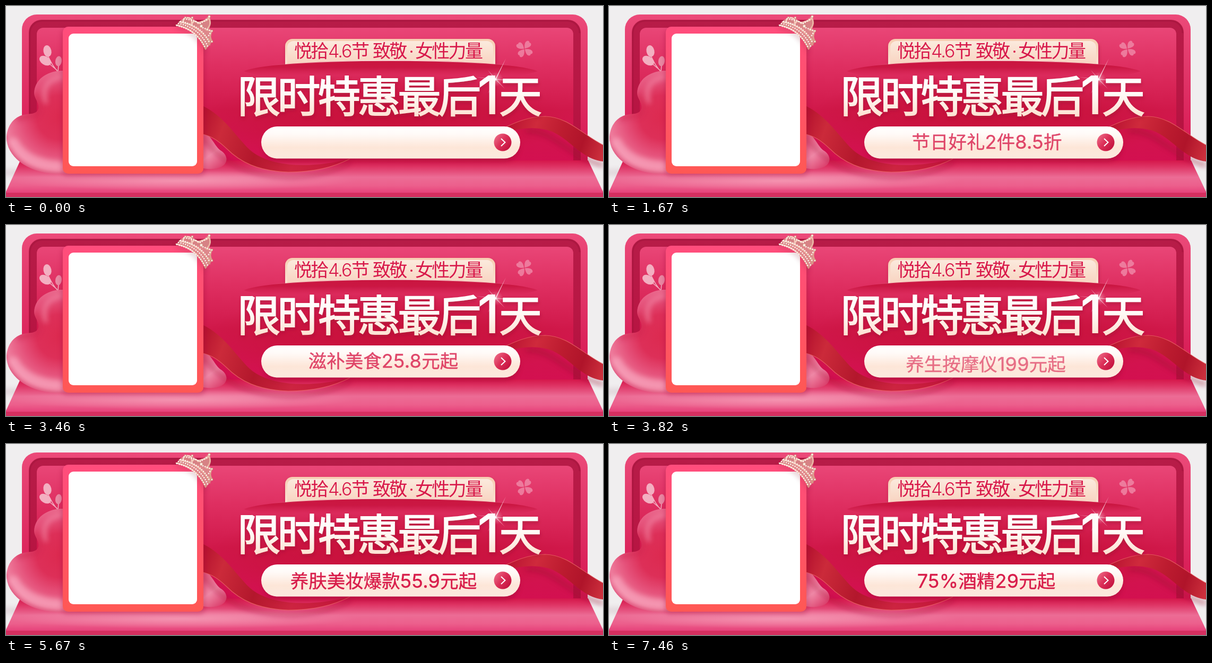
An HTML page for the animation above (8 s loop, 1125 by 360 pixels).

```html
<!DOCTYPE html>
<html lang="zh-CN">
<head>
<meta charset="utf-8">
<title>限时特惠</title>
<style>
html, body { margin: 0; width: 100%; height: 100%; overflow: hidden; background: #f0eeef; }
svg { display: block; width: 1125px; height: 360px; }
text { font-family: "Noto Sans CJK SC", "Noto Sans CJK", sans-serif; }
.num { font-family: Inter, "Liberation Sans", sans-serif; }
.tag { font-size: 34px; font-weight: 300; letter-spacing: -2.7px; fill: #d8184a; }
.title { font-size: 81px; letter-spacing: -5.4px; fill: url(#cream); stroke: url(#cream); stroke-width: 2px; }
.title .num { font-size: 101px; font-weight: 500; stroke: none; }
.offer { font-size: 34.5px; fill: #d81c4a; stroke: #d81c4a; stroke-width: .4px; text-anchor: middle;
  opacity: 0; animation: pass 8s infinite; animation-delay: calc(180ms + var(--i) * 1790ms); }
.offer .num { font-size: 36px; letter-spacing: .3px; }
.offer.last { animation-name: stay; }

/* five 30 ms steps in, hold, five steps out */
@keyframes pass {
  0% { opacity: .2; transform: translateY(8px); animation-timing-function: steps(5, jump-none); }
  1.875% { opacity: 1; transform: translateY(0); animation-timing-function: step-end; }
  18.625% { opacity: .8; transform: translateY(-2px); animation-timing-function: steps(5, jump-none); }
  20.5%, 100% { opacity: 0; transform: translateY(-10px); }
}
@keyframes stay {
  0% { opacity: .2; transform: translateY(8px); animation-timing-function: steps(5, jump-none); }
  1.875% { opacity: 1; transform: translateY(0); animation-timing-function: step-end; }
  8.25%, 100% { opacity: 0; transform: translateY(0); }
}
</style>
</head>
<body>
<svg viewBox="0 0 1125 360">
<defs>
  <linearGradient id="rim" x2="0" y2="1">
    <stop stop-color="#ec4a79"/><stop offset=".3" stop-color="#e33a6c"/><stop offset="1" stop-color="#d6134f"/>
  </linearGradient>
  <linearGradient id="groove" x2="0" y2="1">
    <stop stop-color="#b71c48"/><stop offset=".5" stop-color="#b81744"/><stop offset="1" stop-color="#b50f3e"/>
  </linearGradient>
  <linearGradient id="wall" x2="0" y2="1">
    <stop stop-color="#e94677"/><stop offset=".3" stop-color="#de2e60"/>
    <stop offset=".62" stop-color="#d0184a"/><stop offset="1" stop-color="#d31050"/>
  </linearGradient>
  <radialGradient id="deep">
    <stop stop-color="#c61038" stop-opacity=".85"/><stop offset=".6" stop-color="#c61038" stop-opacity=".5"/>
    <stop offset="1" stop-color="#c61038" stop-opacity="0"/>
  </radialGradient>
  <linearGradient id="floor" x2="0" y2="1">
    <stop stop-color="#d5174b"/><stop offset=".2" stop-color="#de3464"/><stop offset=".52" stop-color="#ec6c95"/>
    <stop offset=".78" stop-color="#ec5f8c"/><stop offset="1" stop-color="#e6427a"/>
  </linearGradient>
  <radialGradient id="sheen">
    <stop stop-color="#f7a3bb" stop-opacity=".75"/><stop offset="1" stop-color="#f7a3bb" stop-opacity="0"/>
  </radialGradient>
  <linearGradient id="slot" x2="0" y2="1">
    <stop stop-color="#c9153f"/><stop offset=".35" stop-color="#cb1743"/><stop offset=".8" stop-color="#cd1b49" stop-opacity="0"/>
  </linearGradient>
  <linearGradient id="arc"><stop stop-color="#ffd8d8" stop-opacity="0"/>
    <stop offset=".5" stop-color="#fff0ec"/><stop offset="1" stop-color="#ffd8d8" stop-opacity="0"/>
  </linearGradient>
  <linearGradient id="label" x2="0" y2="1"><stop stop-color="#fbeadd"/><stop offset="1" stop-color="#f8d2bf"/></linearGradient>
  <linearGradient id="labelRim" x2="0" y2="1"><stop stop-color="#f7cdb2"/><stop offset="1" stop-color="#fae3d4"/></linearGradient>
  <linearGradient id="cream" gradientUnits="userSpaceOnUse" x1="0" y1="130" x2="0" y2="210">
    <stop stop-color="#fff"/><stop offset=".45" stop-color="#fffaf6"/><stop offset="1" stop-color="#fde0d0"/>
  </linearGradient>
  <linearGradient id="pill" x2="0" y2="1">
    <stop stop-color="#fff"/><stop offset=".25" stop-color="#fffaf7"/><stop offset=".65" stop-color="#fde6d8"/><stop offset="1" stop-color="#fbe9de"/>
  </linearGradient>
  <linearGradient id="knob" x2="1" y2=".8">
    <stop stop-color="#ef7790"/><stop offset=".5" stop-color="#dc3159"/><stop offset="1" stop-color="#c20f3c"/>
  </linearGradient>
  <linearGradient id="card" x2="0" y2="1"><stop stop-color="#ff4d7d"/><stop offset="1" stop-color="#ff5854"/></linearGradient>
  <radialGradient id="heart" gradientUnits="userSpaceOnUse" cx="100" cy="210" r="118">
    <stop stop-color="#dc2a50"/><stop offset=".35" stop-color="#dd2f58"/><stop offset=".6" stop-color="#e5517a"/>
    <stop offset=".85" stop-color="#ee7a9b"/><stop offset="1" stop-color="#e0527c"/>
  </radialGradient>
  <linearGradient id="bud" x1=".2" x2=".7" y2="1"><stop stop-color="#dd4d72"/><stop offset=".6" stop-color="#f08aa8"/><stop offset="1" stop-color="#dc426e"/></linearGradient>
  <linearGradient id="ribL" gradientUnits="userSpaceOnUse" x1="372" y1="200" x2="650" y2="300">
    <stop stop-color="#b5122f"/><stop offset=".15" stop-color="#cb2a3a"/><stop offset=".4" stop-color="#b3172c"/>
    <stop offset=".65" stop-color="#cc2440"/><stop offset="1" stop-color="#c3153a"/>
  </linearGradient>
  <linearGradient id="ribR" gradientUnits="userSpaceOnUse" x1="940" y1="215" x2="1125" y2="280">
    <stop stop-color="#b50f30"/><stop offset=".3" stop-color="#cf2a3c"/><stop offset=".55" stop-color="#bd1c30"/>
    <stop offset=".78" stop-color="#b0142a"/><stop offset="1" stop-color="#cc303d"/>
  </linearGradient>
  <linearGradient id="gold" x2="1" y2="1"><stop stop-color="#fae0d2"/><stop offset=".5" stop-color="#f0bfae"/><stop offset="1" stop-color="#d08d78"/></linearGradient>
  <radialGradient id="glow"><stop stop-color="#fff"/><stop offset=".25" stop-color="#fff" stop-opacity=".5"/><stop offset="1" stop-color="#ffd0d8" stop-opacity="0"/></radialGradient>
  <filter id="soft" x="-50%" y="-50%" width="200%" height="200%"><feGaussianBlur stdDeviation="5"/></filter>
  <filter id="drop" x="-5%" y="-20%" width="110%" height="150%">
    <feDropShadow dx="1" dy="4" stdDeviation="3" flood-color="#9c0a30" flood-opacity=".5"/>
  </filter>
  <path id="petal" d="M0-1C-4-5-8-12-4-16Q-1-18 1-15Q4-17 6-13C7-9 3-4 0-1Z"/>
  <clipPath id="heartEdge"><use href="#heartShape"/></clipPath>
  <path id="heartShape" d="M140 122H104C76 123 54 139 53 164C53 174 63 182 61 193C58 206 42 202 30 206C13 211 1 228 1 250C3 286 44 318 108 317H140Z"/>
</defs>

<rect width="1125" height="360" fill="#f0eeef"/>
<ellipse cx="30" cy="314" rx="60" ry="7" fill="#d9c8cf" opacity=".6" filter="url(#soft)"/>

<!-- stage wall -->
<path d="M30 300V44a28 28 0 0 1 28-28H1068a28 28 0 0 1 28 28V300Z" fill="url(#rim)"/>
<path d="M43 291V50a24 24 0 0 1 24-24H1059a24 24 0 0 1 24 24V291Z" fill="url(#groove)"/>
<path d="M45 291V51a23 23 0 0 1 23-23H1058a23 23 0 0 1 23 23" fill="none" stroke="#9b1239" stroke-width="3" opacity=".4"/>
<path d="M58 291V53a12 12 0 0 1 12-12H1057a12 12 0 0 1 12 12V291Z" fill="url(#wall)"/>
<ellipse cx="715" cy="212" rx="345" ry="84" fill="url(#deep)"/>

<!-- floor -->
<path d="M27 291H1097L1125 350V352H0V350Z" fill="url(#floor)"/>
<ellipse cx="330" cy="329" rx="330" ry="19" fill="url(#sheen)"/>
<rect y="352" width="1125" height="8" fill="#d52f60"/>

<!-- sprig -->
<g fill="#f3afc1" stroke="#f3afc1" stroke-width="1.6">
  <path d="M79 94Q87 112 97 123M83 110Q90 116 96 121M99 112L98 123" fill="none"/>
  <ellipse cx="78" cy="85" rx="7.5" ry="11" transform="rotate(-12 78 85)" stroke="none"/>
  <ellipse cx="74" cy="103" rx="8" ry="12" transform="rotate(-58 74 103)" stroke="none"/>
  <ellipse cx="99" cy="104" rx="6" ry="9.5" transform="rotate(8 99 104)" stroke="none" fill="#e98aa4"/>
</g>

<!-- balloon hearts -->
<use href="#heartShape" fill="url(#heart)"/>
<g clip-path="url(#heartEdge)" fill="none" stroke-linecap="round">
  <path d="M104 134C78 138 68 154 74 180" stroke="#f493ad" stroke-width="10" opacity=".5" filter="url(#soft)"/>
  <path d="M14 258C28 286 60 300 104 303" stroke="#f8a5bd" stroke-width="20" opacity=".7" filter="url(#soft)"/>
  <path d="M54 168Q68 190 56 206Q40 208 24 212" stroke="#cf2850" stroke-width="9" opacity=".55" filter="url(#soft)"/>
  <path d="M3 270C20 306 60 318 108 318" stroke="#d23764" stroke-width="6" opacity=".6" filter="url(#soft)"/>
</g>
<path d="M365 232C389 244 391 262 404 272C419 281 419 296 406 303C394 309 376 308 365 304Z" fill="url(#bud)"/>

<!-- ribbon -->
<path d="M372 250C415 305 470 322 540 322C590 320 620 310 650 294" fill="none" stroke="#a50d37" stroke-width="8" opacity=".35" filter="url(#soft)"/>
<path d="M368 187C406 204 428 238 454 266C490 304 570 308 648 288C614 306 572 313 532 313C474 311 441 294 416 269C399 253 387 245 368 241Z" fill="url(#ribL)"/>
<path d="M368 241C387 245 399 253 416 269C441 294 474 311 532 313C572 313 614 306 648 288" fill="none" stroke="#ee6a69" stroke-width="1.2" opacity=".75"/>
<path d="M980 236C1030 232 1060 285 1125 300" fill="none" stroke="#9a0b31" stroke-width="9" opacity=".4" filter="url(#soft)"/>
<path d="M925 236C958 220 984 208 1016 208C1058 209 1084 240 1125 262V293C1084 288 1066 254 1030 237C1003 226 966 229 925 242Z" fill="url(#ribR)"/>
<path d="M925 236C958 220 984 208 1016 208C1058 209 1084 240 1125 262" fill="none" stroke="#ea6464" stroke-width="1.2" opacity=".75"/>

<!-- picture card -->
<rect x="105" y="44" width="270" height="276" rx="10" fill="#a50b38" opacity=".35" filter="url(#soft)"/>
<rect x="107" y="39" width="265" height="277" rx="10" fill="url(#card)"/>
<rect x="118" y="52" width="242" height="250" rx="9" fill="#fff"/>

<!-- crown -->
<g stroke-linejoin="round" stroke-linecap="round">
  <path d="M322 41Q360 48 375 84" fill="none" stroke="#8a2535" stroke-width="5" opacity=".35" filter="url(#soft)"/>
  <path d="M320 37L329 27L338 21L350 22L360 30L371 28L382 19L386 32L383 43L389 47L385 56L389 67L383 74L376 83Q361 46 320 37Z" fill="#dd9490" opacity=".85"/>
  <g fill="none" stroke="url(#gold)" stroke-width="2.6">
    <path d="M321 36Q360 44 376 81M327 30Q369 37 384 73M334 31Q333 22 341 22Q351 21 350 34Q356 24 362 33L370 29Q382 28 382 20M382 21Q389 36 377 45L388 47Q382 58 388 66L380 62"/>
  </g>
  <g fill="none" stroke="#fff6f0" stroke-width="2.6" stroke-dasharray=".1 4.4">
    <path d="M322 37Q360 45 376 80M325 33Q365 41 380 76M329 29Q369 37 384 70M336 24L352 27L366 33L380 24M371 41L387 47L380 59"/>
  </g>
  <g fill="#fbe9e0" stroke="#c47b68" stroke-width=".7">
    <circle cx="338" cy="22" r="1.900"/><circle cx="351" cy="22" r="2"/><circle cx="383" cy="20" r="2.400"/>
    <circle cx="388" cy="47" r="2"/><circle cx="388" cy="67" r="2"/><circle cx="368" cy="38" r="3"/>
  </g>
</g>

<!-- label -->
<g filter="url(#drop)">
  <path d="M526 112V76a14 14 0 0 1 14-14H908a14 14 0 0 1 14 14V112Z" fill="url(#labelRim)"/>
</g>
<path d="M530 112V78a12 12 0 0 1 12-12H906a12 12 0 0 1 12 12V112Z" fill="url(#label)"/>
<path d="M448 123C510 96 940 96 1002 123Q970 133 920 138H530Q480 133 448 123Z" fill="url(#slot)"/>
<path d="M500 111.500Q725 94 950 111.500" fill="none" stroke="url(#arc)" stroke-width="1.5"/>
<g class="tag">
  <text x="543" y="97">悦拾<tspan class="num" x="607" letter-spacing="-2">4.6</tspan><tspan x="651">节</tspan></text>
  <text x="691" y="97">致敬</text>
  <circle cx="764" cy="86" r="2"/>
  <text x="771" y="97">女性力量</text>
</g>

<!-- flower -->
<g transform="translate(977 81) rotate(35)" fill="#f08ba9" opacity=".8">
  <use href="#petal"/><use href="#petal" transform="rotate(90)"/><use href="#petal" transform="rotate(180)"/><use href="#petal" transform="rotate(270)"/>
</g>

<!-- title -->
<g class="title" filter="url(#drop)">
  <text x="436" y="200">限时特惠最后</text>
  <text class="num" x="888" y="204">1</text>
  <text x="929" y="200">天</text>
</g>
<circle cx="923" cy="138" r="14" fill="url(#glow)" opacity=".6"/>
<g fill="#fff">
  <path d="M942 99L923.500 139L908 165L922 137Z" opacity=".7"/>
  <path d="M884 134L923 137L968 142L923 139Z" opacity=".45"/>
  <path d="M908 121L923.500 137L940 156L922 139Z" opacity=".45"/>
</g>

<!-- offer bar -->
<rect x="485" y="236" width="482" height="57" rx="28" fill="#98082f" opacity=".45" filter="url(#soft)"/>
<rect x="481" y="227" width="488" height="60.500" rx="30.250" fill="url(#pill)"/>
<circle cx="936" cy="257" r="16.500" fill="url(#knob)"/>
<path d="M933 250L940.500 257L933 264" fill="none" stroke="#fff" stroke-width="2"/>

<text class="offer" style="--i:0" x="712" y="271">节日好礼<tspan class="num">2</tspan>件<tspan class="num">8.5</tspan>折</text>
<text class="offer" style="--i:1" x="711" y="271">滋补美食<tspan class="num">25.8</tspan>元起</text>
<text class="offer" style="--i:2" x="710" y="271">养生按摩仪<tspan class="num">199</tspan>元起</text>
<text class="offer" style="--i:3" x="711.500" y="271">养肤美妆爆款<tspan class="num">55.9</tspan>元起</text>
<text class="offer last" style="--i:4" x="711" y="271"><tspan class="num">75%</tspan>酒精<tspan class="num">29</tspan>元起</text>
</svg>
</body>
</html>
```
